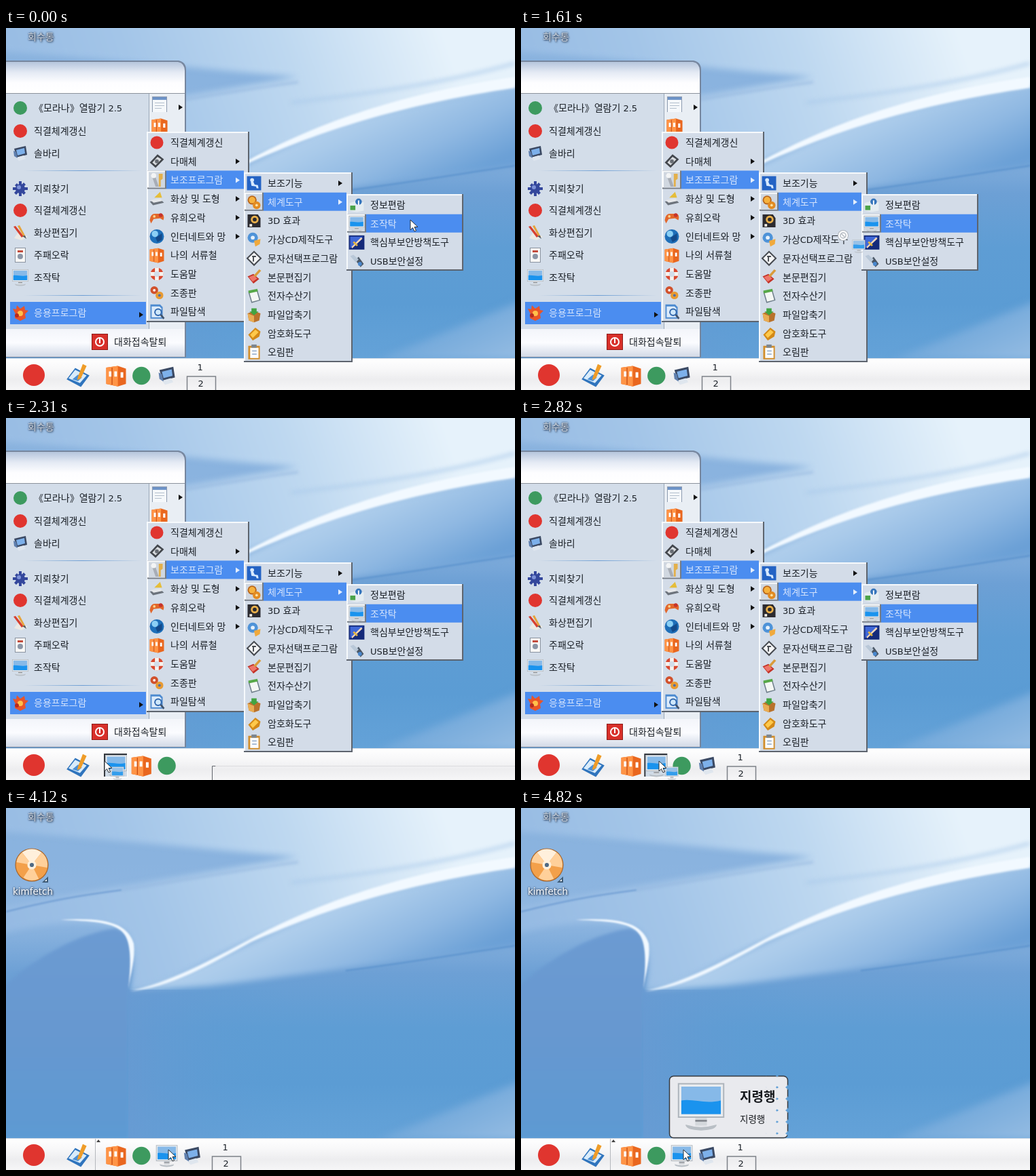
Write an HTML page with a canvas that moves like this. It is 749 by 534 pixels and loops after 6.73 s.

```html
<!DOCTYPE html>
<html lang="ko">
<head>
<meta charset="utf-8">
<style>
html, body { margin: 0; width: 100%; height: 100%; overflow: hidden; background: #5b9bd3; }
canvas { display: block; }
</style>
</head>
<body>
<canvas id="stage" width="749" height="534"></canvas>
<script>
const W = 749, H = 534, LOOP = 6730;
const stage = document.getElementById('stage').getContext('2d');
let g = stage;

function gradient(x0, y0, x1, y1, ...colors) {
  const fill = g.createLinearGradient(x0, y0, x1, y1);
  colors.forEach((c, i) => fill.addColorStop(i / (colors.length - 1), c));
  return fill;
}
function rect(x, y, w, h, fill) {
  g.fillStyle = fill;
  g.fillRect(x, y, w, h);
}
function shape(path, fill, blur = 0) {
  g.filter = blur ? `blur(${blur}px)` : 'none';
  g.fillStyle = fill;
  g.fill(new Path2D(path));
  g.filter = 'none';
}
function line(path, color, width = 1, blur = 0) {
  g.filter = blur ? `blur(${blur}px)` : 'none';
  g.strokeStyle = color;
  g.lineWidth = width;
  g.stroke(new Path2D(path));
  g.filter = 'none';
}
// Hangul and Latin runs use different fonts and sizes.
function text(str, x, y, color = '#1b2027', size = 14, weight = 400) {
  g.fillStyle = color;
  for (const run of str.match(/[ -~]+|[^ -~]+/g)) {
    g.font = run < '\x7f'
      ? `${weight} ${size - 1}px "DejaVu Sans", sans-serif`
      : `${weight} ${size}px "Noto Sans CJK KR", "Noto Sans CJK", sans-serif`;
    g.fillText(run, x, y);
    x += g.measureText(run).width;
  }
}
function layer(paint) {
  const canvas = document.createElement('canvas');
  canvas.width = W;
  canvas.height = H;
  g = canvas.getContext('2d');
  paint();
  g = stage;
  return canvas;
}

// Icons are [colour, path] lists, centred in a box of 24 units.
const disc = (r, x = 0, y = 0) => `M${x - r} ${y}a${r} ${r} 0 1 0 ${2 * r} 0a${r} ${r} 0 1 0 ${-2 * r} 0z`;
const icons = {
  red: [['#e0352f', disc(10)]],
  globe: [['#3d9a5f', disc(10)]],
  pc: [['#3b4963', 'M-9-7L8-11 10 2-5 6z'], ['#7db0ea', 'M-6-5L6-8 7 0-4 3z'], ['#dfe6ee', 'M-6 6L5 3 8 8-2 11z'], ['#5f7fae', 'M-10-4l4 2 2 9-5-3z']],
  mine: [['#34479c', disc(7)], ['#34479c', 'M-2-11H2V11H-2zM-11-2H11V2H-11zM-8-5l3-3L8 6 5 9zM5-9l3 3L-6 9-9 6z'], ['#7d92d8', disc(3, -2, -2)]],
  paint: [['#eceae4', 'M-9 8L-2-2 11 6 2 11z'], ['#d8402f', 'M-10-9l3-1L5 5 2 7z'], ['#e6a33a', 'M-4-10l3-1L8 6 5 6z'], ['#515a66', 'M3 5l4-1 2 5z']],
  cards: [['#8a93a0', 'M-8-11H8V11H-8z'], ['#f8f8f6', 'M-7-10H7V10H-7z'], ['#c44c3c', 'M-4-7H4V-4H-4z'], ['#8b95a5', disc(4, 0, 2)]],
  monitor: [['#aeb5bc', 'M-12-12H12V6H-12z'], ['#e9ecef', 'M-11.3-11.3H11.3V5.3H-11.3z'], ['#86b9e8', 'M-10.2-10.2H10.2V4H-10.2z'],
    ['#1a93ee', 'M-10.2-3C-4-4 2-1 10.2-3V4H-10.2z'], ['#d4d8dc', 'M-3 6H3V10H-3z'], ['#85898f', 'M-3 7H3V8H-3z'], ['#b9bfc5', 'M-8 9.5Q0 12 8 9.5Q8 12.3 0 12.5Q-8 12.3-8 9.5z']],
  apps: [['#e8552a', 'M-11-6l5 1 1-6 5 5 6-4 1 6 5 1-5 5 1 6-8 4-8-4 1-6z'], ['#ffc04a', disc(4, 0, 1)], ['#b92a1f', disc(3, -5, 4)]],
  binder: [['#e9671f', 'M-11-9L2-11 11-8V9L2 12-11 9z'], ['#ff9446', 'M-11-9L2-11V12L-11 9z'], ['#fff', 'M-8-5l3 0v6h-3zM-2-5l3 0v6h-3zM5-4l3 0v6h-3z'], ['#c74c12', 'M-5-9l1 0v19l-1 0z']],
  page: [['#8d9bb0', 'M-11-12H11V11H-11z'], ['#f5f8fb', 'M-10-11H10V11H-10z'], ['#6d93c8', 'M-10-11H10V-7H-10z'], ['#b3bfcc', 'M-7-3H7V-2H-7zM-7 1H7V2H-7zM-7 5H3V6H-7z']],
  media: [['#42464c', 'M-11 2L1-11 11-3-2 10z'], ['#d9dcdf', 'M-7 2L1-7 7-3-2 6z'], ['#686d74', disc(3)]],
  tools: [['#a8adb5', 'M-9-10h5L3 10h-5z'], ['#e3b04b', 'M3-10h6v8l-3 2v10h-3z'], ['#f3f4f5', disc(4, -5, -7)]],
  scan: [['#6c737c', 'M-11 4L6 1l5 5-17 4z'], ['#e5e7ea', 'M-10 2L5-1l4 4-14 3z'], ['#e5bd39', 'M-4-2L5-11 8-2z']],
  game: [['#e2672b', 'M-11 4Q-10-6-3-6H7Q13-4 10 4L5 1-5 2-9 9z'], ['#c5342d', disc(3, 6, -4)], ['#fbd38b', disc(2, -4, -2)]],
  earth: [['#1e6fb9', disc(11)], ['#8bd0f5', disc(5, -3, -4)], ['#134a8a', 'M-2 2L8-5 8 5 1 9z']],
  help: [['#d9482f', disc(10)], ['#f7f3ef', 'M-3-10H3V10H-3zM-10-3H10V3H-10z'], ['#d3dde9', disc(4.5)]],
  gears: [['#d1512c', disc(6, -4, -4)], ['#fff', disc(2, -4, -4)], ['#e79a32', disc(6, 4, 4)], ['#4b6fae', disc(2, 4, 4)]],
  find: [['#4e8bd0', 'M-10-11H5L9-7V11H-10z'], ['#dcebfa', 'M-8-8H4L7-5V9H-8z'], ['#2f66ad', disc(6, 2, 1)], ['#cfe8fb', disc(4, 2, 1)], ['#41546d', 'M5 6l2-2 5 6-2 2z']],
  access: [['#2463c4', 'M-11-11H11V11H-11z'], ['#d7e9ff', disc(3, -3, -5)], ['#d7e9ff', 'M-5-2l4 0 2 4 5 1 1 5-3 0-1-3-7-1z']],
  system: [['#b8651c', disc(7, -3, -3)], ['#f6b23e', disc(5, -3, -3)], ['#e28b22', disc(6, 4, 5)], ['#fbe2a4', disc(2, 4, 5)]],
  effect: [['#2c2b30', 'M-10-10H6L10-4V10H-10z'], ['#e9b04b', disc(6, 1, -2)], ['#2c2b30', disc(3, 1, -2)], ['#f5efe4', 'M-7 5h4v4h-4z']],
  cdTool: [['#4f93d8', disc(8, -2, -3)], ['#e7f1fb', disc(3, -2, -3)], ['#f0a93c', 'M0 2l10-3-1 8-7 4z']],
  chars: [['#45494f', 'M0-12L12 0 0 12-12 0z'], ['#f4f5f6', 'M0-9L9 0 0 9-9 0z'], ['#45494f', 'M-3-4H3V-2H0V5H-2V-2H-3z']],
  write: [['#c33227', 'M-10-1l9-4 9 8-9 7z'], ['#ef766b', 'M-8 0l7-3 6 5-7 5z'], ['#d99c3c', 'M8-12l3 2-9 10-3-2z']],
  calc: [['#6d7d89', 'M-9-6L5-10 10 7-4 11z'], ['#f4f7f4', 'M-7-5L4-8 8 6-3 9z'], ['#57a848', 'M-9-8L5-11 6-7-8-4z']],
  pack: [['#b9722c', 'M-10-2L0-6 10-2 8 9 0 12-8 9z'], ['#e9ad54', 'M-10-2L0 2V12L-8 9z'], ['#41a441', 'M-4-10H4V-5H7L0 1-7-5H-4z']],
  lock: [['#d48a18', 'M-9 2L2-9 10-3 8 5-2 11z'], ['#ffc94b', 'M-6 2L2-6 7-2-2 7z']],
  clip: [['#d18e2c', 'M-9-10H9V11H-9z'], ['#fbfcfc', 'M-6-7H7V9H-6z'], ['#7b858f', 'M-4-12H4V-7H-4z'], ['#9db4cf', 'M-3-3H4V-1H-3zM-3 2H4V4H-3z']],
  info: [['#e4ecf1', 'M-11-3L0-6 11-4V9L0 11-11 9z'], ['#4ba34a', 'M-10 1H-2V8H-10z'], ['#3474bb', disc(5, 3, -5)], ['#fff', 'M2-7H4V0H2z']],
  secure: [['#152a7a', 'M-12-11H12V11H-12z'], ['#3f68d8', 'M-10-9H10L-10 9z'], ['#f5d8ba', 'M7-8l2 2L-7 9-8 7z'], ['#e5b640', 'M-6 0l2-2 6 6-2 2z']],
  usb: [['#4a5665', 'M-2-2l5-5L11 4 6 9z'], ['#b9c8d8', 'M-10-8l5-2 8 7-4 5z'], ['#4a88cf', disc(3, 5, 4)]],
  power: [['#8e1b17', 'M-12-12H12V12H-12z'], ['#d8302a', 'M-11-11H11V11H-11z'], ['#fff', disc(7)], ['#d8302a', disc(5)], ['#fff', 'M-1-6H1V2H-1z']],
  note: [['#2f74bd', 'M-12 3L-3-9 12-1 3 11z'], ['#d9ecfb', 'M-10 2L-3-7 9-1 2 7z'], ['#4d91d6', 'M-6 3L0-2 4 1 0 5z'], ['#ef9c28', 'M5-13l4 2-6 13-4 2 1-4z']],
  disk: [['#a8672d', disc(12)], ['#f3a04a', disc(11.4)], ['#fff0dc', 'M0 0L-7-9A11 11 0 0 1 7-9z'], ['#ffd09a', 'M0 0L7-9A11 11 0 0 1 11 2zM0 0L-11-2A11 11 0 0 1-7-9zM0 0L5 10A11 11 0 0 1-6 9z'],
    ['#fff0dc', disc(3.2)], ['#4f6a85', disc(1.5)]],
};
function icon(name, x, y, scale = 0.95) {
  g.save();
  g.translate(x, y);
  g.scale(scale, scale);
  for (const [color, path] of icons[name]) shape(path, color);
  g.restore();
}

function desktopLabel(str, x, y, color, size) {
  g.shadowColor = '#1d2c44';
  g.shadowBlur = 3;
  for (const shift of [0, 1]) {
    g.shadowOffsetX = g.shadowOffsetY = shift;
    text(str, x, y, color, size);
  }
  g.shadowColor = 'transparent';
}

function paintDesktop() {
  rect(0, 0, W, H, gradient(0, 0, 0, 487, '#8ab3de', '#8ab3df', '#90b7e1', '#6da0d5', '#5e9dd4', '#5b9cd4', '#64a2d8'));
  // light sky, the glow under the ridge and the darker left slope
  shape('M-20-20H780V85C600 108 480 145 360 195C280 233 230 268 182 270C186 250 194 195 173 180C150 165 60 162-20 190V148C150 118 300 95 430 72C300 62 150 45-20 34z',
    gradient(0, 220, 640, 0, '#94b9e2', '#a3c5e8', '#bed8f0', '#e6f2fb'), 5);
  shape('M182 270C230 265 360 197 480 145C600 110 780 82 780 82V200C600 220 450 245 300 262z',
    gradient(420, 130, 500, 300, '#bbd5ef', '#a9caea', '#8fb8e2', '#6ba0d6'), 4);
  shape('M-10 268C50 215 110 185 160 178C193 185 188 230 180 275V487H-10z',
    gradient(0, 180, 0, 487, '#6c9bd2', '#6798d0', '#5d9ad3'), 2);
  rect(180, 268, 240, 219, gradient(180, 0, 420, 0, 'rgba(104,154,210,.8)', 'rgba(92,156,212,0)'));
  shape('M770 398C690 430 620 460 545 490H770z', gradient(680, 520, 640, 440, '#93bbe2', '#72a8da'), 6);
  line('M0 153C60 138 100 130 170 121', '#6f9cd2', 2, 1);
  line('M170 121C250 108 340 92 430 80', '#93b5dd', 2, 2);
  line('M749 203C650 218 580 230 500 240', '#5c93cd', 2, 1);
  line('M420 110C550 95 650 80 749 52', '#a9c9ea', 3, 3);
  shape('M182 270C240 258 300 225 360 193C450 146 560 100 749 72V88C580 113 460 153 360 198C300 231 240 266 182 270', '#f2f9ff', 1.5);
  shape('M80 165C150 160 180 172 188 200C191 222 183 245 180 267C183 240 186 202 174 186C163 171 140 167 80 165', '#f2f9ff', 1);

  desktopLabel('회수통', 32, 18, '#c6cfda');
  desktopLabel('kimfetch', 10, 128, '#eef3f9', 14.5);
  icon('disk', 38, 84, 2.05);
  shape('M53 110L62 101V110z', '#3d5a75');
  shape('M57 108L60 105V108z', '#fff');
}

const arrow = (x, y, color) => shape(`M${x - 3} ${y - 4}L${x + 3} ${y} ${x - 3} ${y + 4}z`, color);

// rows: "icon label", with a trailing ">" for a submenu
function menu(x, y, w, h, selected, selEnd, arrowX, rows) {
  rect(x, y, w, h, '#5d646e');
  rect(x, y, w - 2, h - 2, '#f6f9fc');
  rect(x + 2, y + 2, w - 4, h - 4, '#d3dce8');
  rows.forEach((row, i) => {
    const [, name, label, sub] = row.match(/(\w+) ([^>]+)(>?)/);
    const cy = y + 16 + i * 27.7, on = i === selected;
    if (on) {
      rect(x + 29, cy - 14, selEnd - x - 29, 27, '#4b8df0');
      rect(x + 1, cy - 14, 28, 27, '#747b85');
      rect(x + 1, cy - 14, 26, 25, '#fafbfc');
      rect(x + 3, cy - 12, 24, 23, '#d0d7e0');
    }
    icon(name, x + 15, cy);
    text(label, x + 35, cy + 5, on ? '#d5e4fc' : undefined);
    if (sub) arrow(arrowX, cy, on ? '#e4eefc' : '#111');
  });
}

function paintMenus() {
  shape('M0 48H254Q265 50 265 62V486H0z', '#76869e');
  shape('M0 50H253Q263 52 263 63V96H0z', gradient(0, 50, 0, 96, '#b5c5dc', '#e4eaf4', '#fdfdff', '#fff'));
  rect(0, 96, 263, 349, '#d3dde9');
  rect(211, 97, 52, 348, '#e9eef4');
  rect(0, 96, 263, 1, '#8b929c');
  rect(210, 97, 1, 347, '#9ba8b8');
  rect(0, 444, 263, 41, gradient(0, 444, 0, 485, '#f3f5fa', '#fbfcff', '#d2d9e6'));
  for (const y of [210, 394]) rect(26, y, 174, 1, gradient(26, 0, 200, 0, '#d3dde9', '#6c9dd3', '#d3dde9'));
  rect(6, 404, 200, 33, '#4b8df0');
  const entries = [
    ['globe', '《모라나》열람기 2.5', 118], ['red', '직결체계갱신', 152], ['pc', '솔바리', 185],
    ['mine', '지뢰찾기', 237], ['red', '직결체계갱신', 269], ['paint', '화상편집기', 302],
    ['cards', '주패오락', 335], ['monitor', '조작탁', 368], ['apps', '응용프로그람', 420],
  ];
  for (const [name, label, y] of entries) {
    icon(name, 21, y, 1);
    text(label, 41, y + 5, y === 420 ? '#d5e4fc' : undefined);
  }
  arrow(199, 423, '#111');
  arrow(257, 117, '#111');
  icon('page', 226, 113, 1);
  icon('binder', 226, 145, 1.05);
  icon('power', 138, 463, 1);
  text('대화접속탈퇴', 159, 468);

  menu(207, 153, 151, 281, 2, 350, 341, ['red 직결체계갱신', 'media 다매체>', 'tools 보조프로그람>', 'scan 화상 및 도형>',
    'game 유희오락>', 'earth 인터네트와 망>', 'binder 나의 서류철', 'help 도움말', 'gears 조종판', 'find 파일탐색']);
  menu(350, 213, 160, 280, 1, 501, 492, ['access 보조기능>', 'system 체계도구>', 'effect 3D 효과', 'cdTool 가상CD제작도구',
    'chars 문자선택프로그람', 'write 본문편집기', 'calc 전자수산기', 'pack 파일압축기', 'lock 암호화도구', 'clip 오림판']);
  menu(501, 245, 172, 113, 1, 671, 0, ['info 정보편람', 'monitor 조작탁', 'secure 핵심부보안방책도구', 'usb USB보안설정']);
}

function drawPanel(slot, pressed, redrawing, hovered) {
  rect(0, 487, W, 47, gradient(0, 487, 0, 534, '#fff', '#f8f8f9', '#ededef', '#f6f6f7'));
  rect(0, 487, W, 1, '#d5dce5');
  icon('red', 41, 512, 1.6);
  icon('note', 106, 514, 1.4);
  if (hovered) {
    rect(131, 488, 1, 46, '#b5b8bd');
    shape('M133 493L136 489 139 493z', '#444');
  }
  const applets = ['binder', 'globe', 'pc'];
  if (slot >= 0) applets.splice(slot, 0, 'monitor');
  applets.forEach((name, i) => {
    const x = 162 + i * 37.3;
    if (redrawing && i === 3) return;
    if (i === slot && pressed) {
      rect(x - 18, 495, 35, 35, '#fff');
      rect(x - 18, 495, 34, 34, '#33373d');
      rect(x - 16, 497, 32, 32, '#cfdae6');
    }
    icon(name, x, 513, name === 'pc' ? 1.2 : 1.32);
  });
  const px = slot < 0 ? 266.5 : 303.5;
  if (redrawing) {
    line(`M${px} 534V513.5H${px + 5}`, '#60646b');
    line(`M${px + 5} 513.5H749`, '#dcdcdf');
    return;
  }
  g.strokeStyle = '#7d8188';
  g.lineWidth = 1.5;
  g.strokeRect(px, 514, 42, 24);
  text('1', px + 15, 505);
  text('2', px + 16, 529);
}

// The tip appears through a grid of growing circles, larger on the left.
function drawTip(q) {
  const missing = (4820 - Math.min(q, 4820)) / 25;
  g.save();
  g.beginPath();
  for (let x = 224; x <= 400; x += 16) {
    const r = 10 + (384 - x) / 16 - missing;
    if (r <= 0) continue;
    for (let y = 386.5; y < 500; y += 17) {
      g.moveTo(x + r, y);
      g.arc(x, y, r, 0, 7);
    }
  }
  g.clip();
  g.beginPath();
  g.roundRect(218.5, 395.5, 174, 91, 6);
  g.fillStyle = '#e9eaee';
  g.fill();
  g.strokeStyle = '#34383e';
  g.lineWidth = 1.5;
  g.stroke();
  icon('monitor', 265, 440, 2.85);
  text('지령행', 322, 433, '#15181c', 19, 700);
  text('지령행', 322, 464, '#15181c', 13.5);
  g.restore();
}

// Pointer keys: time, x, y
const keys = [[1110, 595, 283], [1310, 562, 289], [1610, 478, 304], [2310, 145, 506], [2820, 203, 506], [3120, 240, 506], [4120, 239, 504]];
function pointerAt(t) {
  if (t <= keys[0][0]) return keys[0].slice(1);
  const i = keys.findIndex(k => k[0] > t);
  if (i < 0) return keys.at(-1).slice(1);
  const [t0, x0, y0] = keys[i - 1], [t1, x1, y1] = keys[i];
  const p = (t - t0) / (t1 - t0);
  return [x0 + (x1 - x0) * p, y0 + (y1 - y0) * p];
}
function drawPointer(x, y, forbidden) {
  if (forbidden) {
    shape(disc(8, x - 4, y + 2), '#aeb4bb');
    shape(disc(7, x - 4, y + 2), '#fff');
    line(disc(4, x - 4, y + 2) + `M${x - 7} ${y - 1}l6 6`, '#b5bbc2', 1.5);
    return;
  }
  g.save();
  g.translate(x, y);
  const path = 'M0 0V15L3.5 11.5 6 17 8.5 16 6 10.5H11z';
  shape(path, '#fff');
  line(path, '#2b3037');
  g.restore();
}

const desktop = layer(paintDesktop), menus = layer(paintMenus);

function draw(q) {
  const [x, y] = pointerAt(q);
  const inPanel = q >= 2310, dragging = q >= 1310 && q < 3820;
  const slot = !inPanel ? -1 : x < 181 ? 0 : x < 218 ? 1 : 2;
  g.drawImage(desktop, 0, 0);
  drawPanel(slot, q < 3920, q === 2310, q >= 4120);
  if (q < 4120) g.drawImage(menus, 0, 0);
  if (q >= 4420) drawTip(q);
  if (dragging) {
    g.globalAlpha = 0.8;
    icon('monitor', x + 19, y + 18, 0.8);
    g.globalAlpha = 1;
  }
  drawPointer(x, y, dragging && !inPanel);
}

let last = -1;
function tick(now) {
  const t = now % LOOP;
  // The picture advances in steps of 100 ms.
  const offset = t < 2710 ? 10 : 20;
  const q = Math.max(0, Math.floor((t - offset) / 100) * 100 + offset);
  if (q !== last) draw(last = q);
  requestAnimationFrame(tick);
}
draw(0);
requestAnimationFrame(tick);
</script>
</body>
</html>
```
